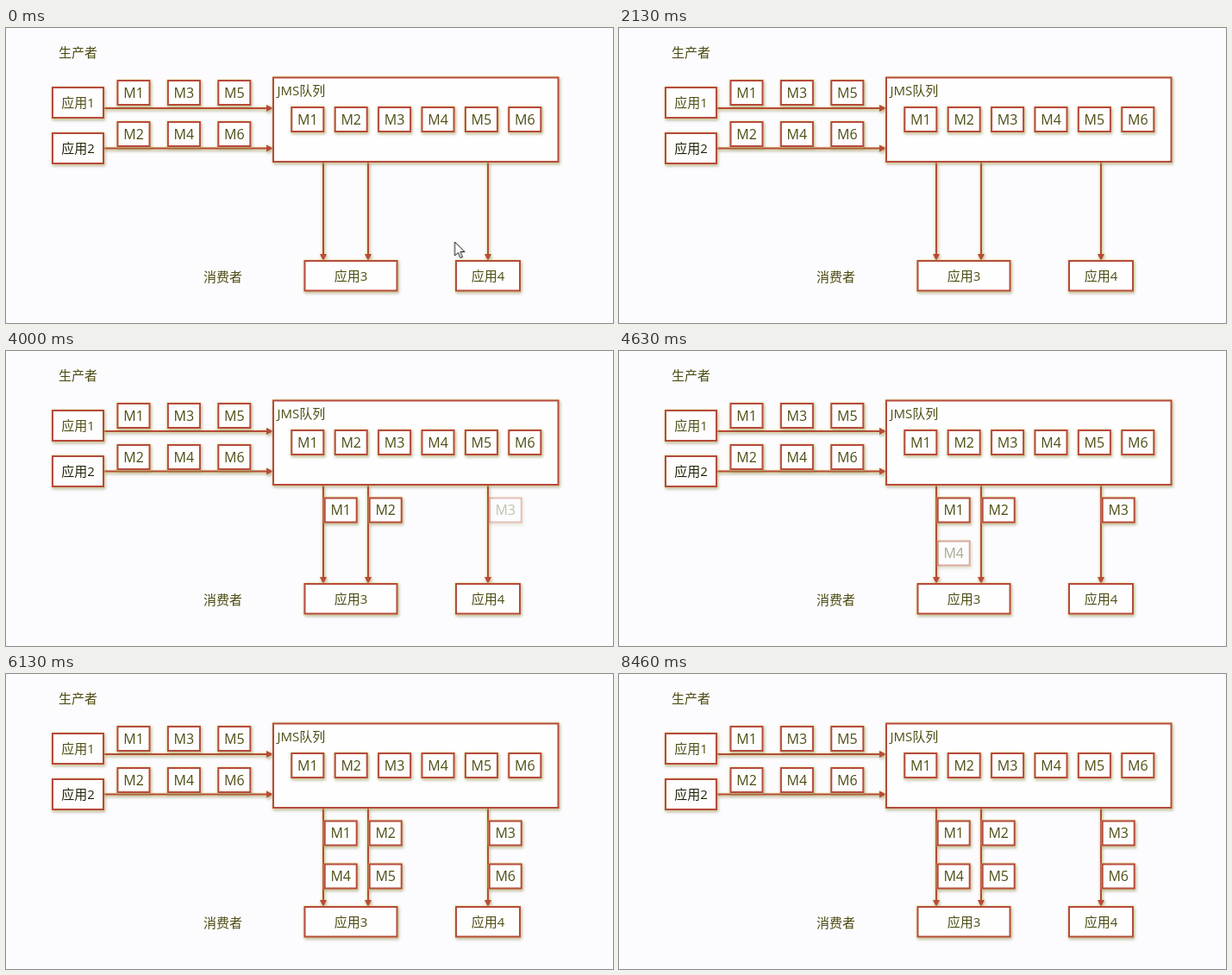
An HTML page for the animation above (8.5 s loop, 704 by 342 pixels).

```html
<!DOCTYPE html>
<html lang="zh">
<head>
<meta charset="utf-8">
<title>JMS队列</title>
<style>
@property --t { syntax: '<number>'; inherits: true; initial-value: 0; }
html, body { margin: 0; width: 100%; height: 100%; overflow: hidden; background: #fcfcfe; }
svg {
  display: block;
  width: 704px;
  height: 342px;
  font: 15px "Open Sans", "Noto Sans CJK SC", "Noto Sans CJK", sans-serif;
  fill: #4f4d14;
  animation: clock 8500ms linear infinite;
}
rect { fill: #fefefe; stroke: #b64a3d; stroke-width: 2; }
.line { fill: none; stroke: #b64a3d; stroke-width: 2; }
.head { fill: #b64a3d; }
.shade { filter: drop-shadow(0 0 1px #e6e378) drop-shadow(1.5px 2px 1.5px rgba(120, 110, 60, .45)); }
.center { text-anchor: middle; }
.message { font-size: 16px; }
.delivered { opacity: calc((var(--t) - var(--start)) / 500); }
.strong { fill: #222208; }
.cursor { fill: #fff; stroke: #111; animation: leave 8500ms infinite; }
@keyframes clock { from { --t: 0; } to { --t: 8500; } }
@keyframes leave {
  0% { transform: translate(520.5px, 248px); animation-timing-function: steps(6, end); }
  2.9% { transform: translate(702.5px, 236px); animation-timing-function: step-end; }
  3.86%, 100% { transform: translate(760px, 230px); }
}
</style>
</head>
<body>
<svg viewBox="0 0 704 342">
  <defs>
    <marker id="tip" markerUnits="userSpaceOnUse" markerWidth="8" markerHeight="8" refX="8" refY="4" orient="auto">
      <path class="head" d="M0 0 8 4 0 8Z"/>
    </marker>
  </defs>
  <text x="61" y="34">生产者</text>
  <text x="229" y="293.5">消费者</text>
  <g id="diagram"></g>
  <path class="cursor" d="M0 0V16L4 12.5 6.5 18.5 9 17.5 6.5 11.5H11.5Z"/>
</svg>
<script>
const diagram = document.getElementById('diagram');

function add(tag, attributes, parent = diagram, text = '') {
  const node = document.createElementNS('http://www.w3.org/2000/svg', tag);
  for (const key in attributes) node.setAttribute(key, attributes[key]);
  node.textContent = text;
  return parent.appendChild(node);
}

function box(x, y, width, height, label, className = '') {
  const group = add('g', { class: 'shade ' + className });
  add('rect', { x, y, width, height }, group);
  add('text', { class: 'center', x: x + width / 2, y: y + height / 2 + 5.6 }, group, label);
  return group;
}

const message = (number, x, y, className = '') =>
  box(x, y, 37, 28, 'M' + number, 'message ' + className);

function arrow(x, y, direction, length) {
  const group = add('g', { class: 'shade' });
  // The shaft stops short so that the head keeps a sharp point.
  add('path', { class: 'line', d: `M${x} ${y}${direction}${length - 5}` }, group);
  const end = direction === 'h' ? [x + length, y] : [x, y + length];
  const d = direction === 'h'
    ? `M${end}l-8 -4v8Z`
    : `M${end}l-4 -8h8Z`;
  add('path', { class: 'head', d }, group);
}

arrow(114, 93, 'h', 196);
arrow(114, 139.5, 'h', 196);
const lanes = [368, 420, 559];
lanes.forEach(x => arrow(x, 156, 'v', 114));

box(54, 69, 59, 35, '应用1');
box(54, 122, 59, 35, '应用2', 'strong');
box(310, 57.5, 330.5, 97.5, '');
add('text', { x: 314.5, y: 77.5 }, diagram, 'JMS队列');
box(346.5, 270, 107, 34.5, '应用3');
box(522, 270, 74, 34.5, '应用4');

for (let i = 0; i < 6; i++) {
  const row = i % 2, column = Math.floor(i / 2);
  message(i + 1, 129.5 + 58.4 * column, 61 + 48 * row);
  message(i + 1, 331.3 + 50.4 * i, 92);
  const lane = i % 3, level = Math.floor(i / 3);
  message(i + 1, lanes[lane] + 1.7, 170.5 + 50 * level, 'delivered')
    .style.setProperty('--start', 2710 + 562 * i);
}
</script>
</body>
</html>
```
